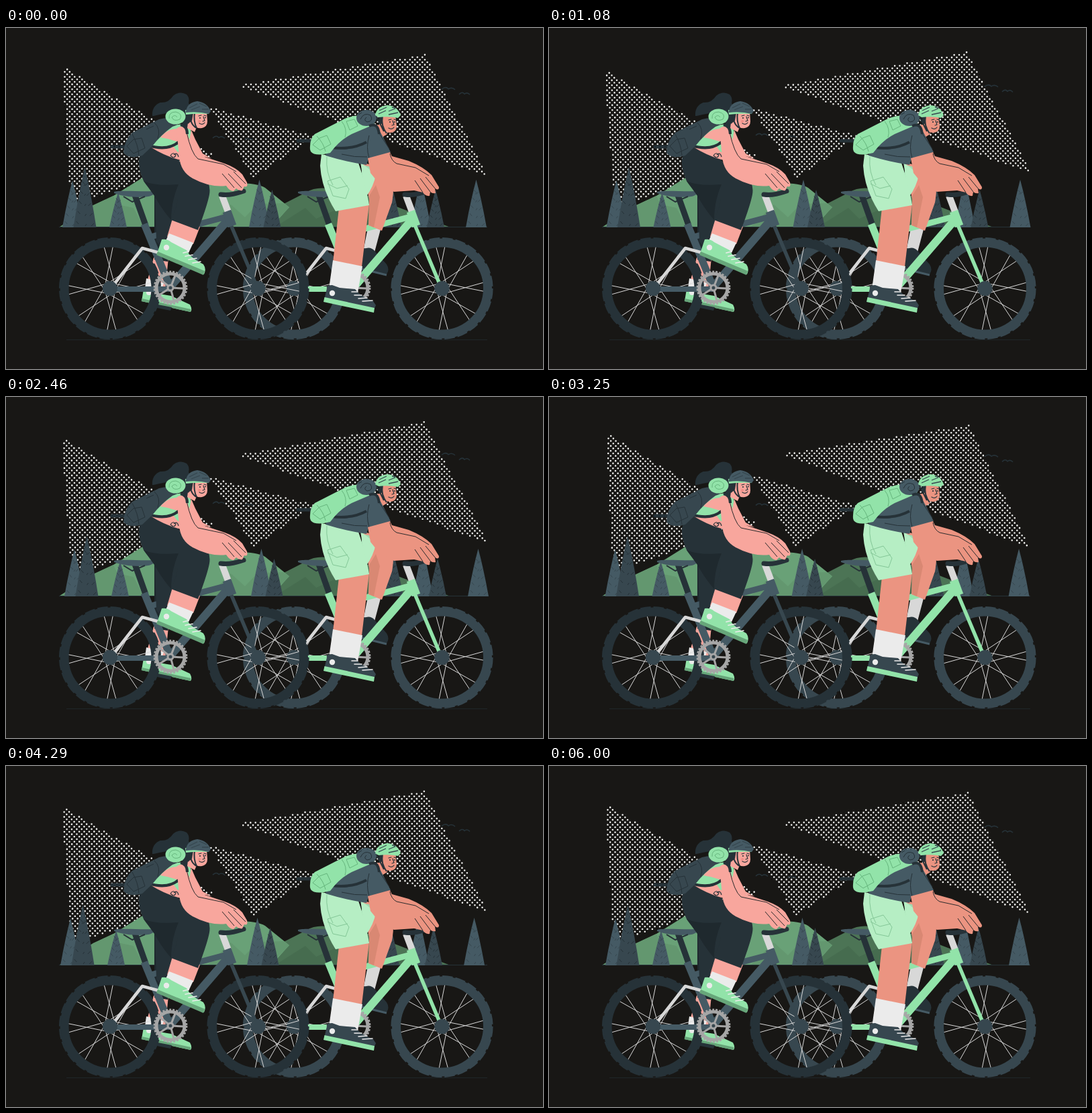
Write an HTML page that moves like this. It is 800 px wide and 508 px high and loops after 6.04 s.

```html
<!DOCTYPE html>
<html lang="en">
<head>
<meta charset="utf-8">
<title>Cyclists</title>
<style>
html, body { margin: 0; width: 100%; height: 100%; overflow: hidden; background: #181715; }
svg { display: block; width: 800px; height: 508px; }
</style>
</head>
<body>
<svg id="stage" viewBox="0 0 800 508" fill="none" stroke-linejoin="round"></svg>
<script>
const stage = document.getElementById("stage");
const INK = "#263238", SLATE = "#37474f", STEEL = "#455a64", MINT = "#92e3a9",
  PALE = "#b6eec4", ROSE = "#f8a69d", CLAY = "#eb9481", GREY = "#d8d8d8", WHITE = "#ebebeb";

const shape = (fill, d) => `<path fill="${fill}" d="${d}"/>`;
const line = (color, width, d, cap = "butt") =>
  `<path stroke="${color}" stroke-width="${width}" stroke-linecap="${cap}" d="${d}"/>`;
const disc = (x, y, r, fill) => `<circle cx="${x}" cy="${y}" r="${r}" fill="${fill}"/>`;
const ring = (x, y, r, color, width, extra = "") =>
  `<circle cx="${x}" cy="${y}" r="${r}" stroke="${color}" stroke-width="${width}" ${extra}/>`;
const polar = (x, y, r, a) => `${(x + r * Math.cos(a)).toFixed(1)} ${(y + r * Math.sin(a)).toFixed(1)}`;

function tree(x, top, half, color, mark) {
  const h = 297 - top;
  let twigs = "";
  for (let i = 2; i <= 6; i++) {
    const y = top + h * i / 6, w = half * i / 6;
    twigs += `M${x + w * .8} ${y - 6}l-4 4M${x - w * .75} ${y - 9}l3.5 4M${x + w * .15} ${y - 5}l-2 3`;
  }
  return shape(color, `M${x} ${top}Q${x + half * .55} ${top + h * .45} ${x + half} 297H${x - half}Q${x - half * .55} ${top + h * .45} ${x} ${top}Z`) +
    line(mark, 1, twigs);
}

function wheel(x, y, color) {
  let spokes = "";
  for (let i = 0; i < 16; i++) {
    const a = i * Math.PI / 8 + .12 + (i % 2 ? .13 : -.05);
    spokes += `M${polar(x, y, 9, a + (i % 2 ? 1 : -1))}L${polar(x, y, 63, a)}`;
  }
  return line(GREY, 1, spokes) + ring(x, y, 68, color, 13) +
    ring(x, y, 74.6, color, 3, 'stroke-dasharray="15.5 4.03"') + disc(x, y, 11, SLATE);
}

function chainring(x, y) {
  let arms = "";
  for (let i = 0; i < 5; i++) arms += `M${x} ${y}L${polar(x, y, 20, i * Math.PI * .4 - 1.2)}`;
  return ring(x, y, 21, "#a6a6a6", 5) + ring(x, y, 24.2, "#a6a6a6", 2.4, 'stroke-dasharray="3 2.07"') +
    line("#a6a6a6", 3, arms) + disc(x, y, 5.5, "#a6a6a6") + disc(x, y, 2.5, SLATE);
}

function bike(x, frame, fork, tyre) {
  // x is the rear hub, all tubes are relative to it
  return wheel(x, 388, tyre) + wheel(x + 220.5, 388, tyre) +
    `<g transform="translate(${x} 0)">` +
    line(INK, 9, "M37 249L53 294") +
    line(frame, 11, "M51 292L90 387") +
    line(frame, 9, "M57 312L178 280") +
    line(frame, 12, "M91 384L178 283") +
    line(frame, 8, "M0 389H90") +
    line(GREY, 4.5, "M5 383L48 328L74 335") +
    line(fork, 5.5, "M179 291L219 386") +
    line(GREY, 10, "M167 250L176 274") +
    line(frame, 13, "M174 273L182 295") +
    disc(0, 388, 11, SLATE) + disc(220.5, 388, 11, SLATE) +
    shape(STEEL, "M6 244C14 241 45 244 65 243C69 245 64 250 57 251C42 253 22 252 6 246Z") +
    line(INK, 2, "M20 251L33 259L52 251") +
    line(INK, 7, "M165 248C178 250 190 246 199 243", "round") + "</g>";
}

const sky = `
  <path class="patch" d="M83.5 57L310 190L97 263Z"/>
  <path class="patch" d="M302 117L460 162L368 223Z"/>
  <path class="patch" d="M346 86L624.5 39.5L717 220.5Z"/>
  <path id="dots" stroke="#f0f0ee" stroke-width="2.6" stroke-linecap="round"/>`;

const birds = [[317, 162, 9], [659, 89.5, 10], [683, 97, 8], [362, 165, 6]].map(([x, y, w]) =>
  line(INK, 1.6, `M${x - w} ${y + 2}q${w * .6} -5 ${w} -.5q${w * .5} -3.5 ${w} 1`)).join("");

const hills =
  shape("#4c7455", "M398 270L447 245Q460 237 478 239L540 250L662 297H390Z") +
  shape("#466c4f", "M400 297L446 268L462 284L498 268L660 297Z") +
  shape("#69a177", "M79 297L130 264L160 250L205 222Q230 202 262 208L306 234L345 231Q374 231 386 238L422 267L395 297Z") +
  shape("#63976f", "M79 297L130 264L160 250L166 263L190 268L205 297Z") +
  shape("#63976f", "M300 297L335 263L356 282L375 262L414 261L422 267L392 297Z") +
  line(INK, 1, "M79 296.5H717");

const woods =
  tree(575, 236, 14, SLATE, INK) +
  tree(99, 227, 15, STEEL, SLATE) + tree(117.5, 207, 17, SLATE, INK) + tree(167, 245, 13, STEEL, SLATE) +
  tree(377.5, 226, 15.5, STEEL, SLATE) + tree(396.5, 241, 13, SLATE, INK) +
  tree(618, 226, 15, STEEL, SLATE) + tree(640, 241, 13, SLATE, INK) + tree(700.5, 226, 15.5, STEEL, SLATE);

const man =
  // far leg
  shape(GREY, "M540 293L558 300L549 334L533 328Z") +
  shape(INK, "M530 330Q543 324 549 332L567 352Q572 360 567 367L524 357Z") +
  line(STEEL, 3, "M526 358L567 368") +
  bike(429, MINT, MINT, SLATE) + chainring(518, 387) +
  shape(CLAY, "M530 200L573 212Q580 232 575 260L560 302L540 294L541 255Z") +
  shape("#d98873", "M551 234L541 250V294L548 297L557 252Z") +
  shape("#a0dab1", "M530 204L550 208L549 225L541 244L530 258Z") +
  shape(PALE, "M528 200L551 218Q548 236 536 252Z") +
  // near leg
  shape(CLAY, "M496 268L541 262L530 356L487 350Z") +
  shape(WHITE, "M487 346L531 355L524 394L481 389Z") +
  shape(SLATE, "M478 388Q476 383 486 383L497 387L520 389Q528 400 547 407L551 413L548 420L474 405Z") +
  shape(MINT, "M474.5 401L549 417L548 424L473 408Z") +
  disc(486, 395, 4.2, WHITE) +
  line(WHITE, 1.6, "M515 393L524 393M519 398L530 398M525 403L538 402M531 407L546 406", "round") +
  // shorts
  shape(PALE, "M470 188Q500 193 525 201Q536 232 541 264L491 273Q470 240 468 205Z") +
  line("#84c797", 1, "M478 192Q476 215 487 234M479 228L498 222L511 240L506 254L487 250ZM479 232L493 239L509 235") +
  // shirt and neck
  shape(CLAY, "M548 145L566 143L568 158L555 166Z") +
  shape(STEEL, "M476 190L484 168L540 140Q556 149 562 163L573 185L540 195L537 204Q505 199 476 190Z") +
  line(INK, 1, "M541 160Q536 178 541 194M556 157L571 180M500 188Q520 193 538 192") +
  line(INK, 4, "M484 178Q515 182 537 170") +
  // arms
  shape(CLAY, "M539 194L572 185L575 191L600 198Q622 207 634 219L645 237Q645 243 639 239L640 246Q635 247 632 244L631 250Q625 251 621 245L608 242L578 244Q554 232 543 216Z") +
  line("#2b2b2c", 1, "M572 187Q574 198 582 202L610 208L630 220M609 227L621 245M617 224L632 244M625 222L640 240") +
  // bag
  line(INK, 5, "M435 168L455 168", "round") +
  shape(MINT, "M453 181Q452 165 460 158L505 135Q530 125 548 137Q552 142 543 146L515 158Q497 167 483 186Q460 192 454 184Z") +
  line("#66b57d", 1, "M463 161Q473 171 476 184M457 174L467 164L478 160L484 173L468 182ZM507 139L519 136L524 146L512 152ZM500 139Q509 150 505 163") +
  `<ellipse cx="537" cy="134" rx="15" ry="12" fill="${STEEL}"/>` +
  line(INK, 1, "M528 136Q533 125 543 130Q548 139 538 140Q532 137 537 133M525 129L530 126") +
  line(INK, 4, "M541 146Q554 140 556 158") +
  // head
  shape(CLAY, "M557 130L580 130L582 146Q582 155 573 156Q562 157 558 145Z") +
  shape(INK, "M555 129L562 130L561 142L557 144Z") +
  line(INK, 2, "M560 131Q559 147 567 157M552 132L563 154") +
  line(INK, 1.2, "M570 137l4 -1M578 136l3 1M576 138l2 6l-3 1M570 149q5 3 8 -1", "round") +
  disc(572, 140, 1.1, INK) + disc(579, 140, 1, INK) +
  shape(MINT, "M550 130Q552 117 568 115Q583 116 588 130L584 134Q570 131 555 133Z") +
  line(SLATE, 1.3, "M556 123L567 118M555 128L566 123M570 124L580 120M570 129L584 126M575 118l5 1");

const woman =
  // far leg
  shape(ROSE, "M220 342L242 342L237 392L208 386Z") +
  shape(WHITE, "M209 373L235 380L230 394L207 388Z") +
  shape(MINT, "M205 389Q218 386 228 396L246 399L274 412Q278 419 275 423L202 407Z") +
  line("#67a67a", 4, "M202 405L275 421") + disc(213, 394, 4, WHITE) +
  shape("#1f292e", "M221 248L262 250L249 312L241 348L221 345Z") +
  bike(155, STEEL, SLATE, INK) +
  shape(INK, "M222 250L262 250L246 300L231 325L224 318Z") +
  shape(INK, "M226 412L247 416L245 421L225 417Z") +
  chainring(245, 387) +
  // near leg
  shape(ROSE, "M248 284L289 296L279 322L240 311Z") +
  shape(WHITE, "M243 306L279 320L272 335L236 321Z") +
  shape(MINT, "M232 315Q240 314 246 319L269 331Q275 343 294 352Q299 359 295 367L225 336Z") +
  shape("#67a67a", "M226 333L296 362L294 368L224 338Z") +
  disc(239, 327, 4.2, WHITE) +
  line(WHITE, 1.6, "M264 335L272 333M267 340L278 338M272 345L284 343M278 350L290 348", "round") +
  shape(INK, "M198 196Q200 183 214 176L256 195Q266 213 292 222Q306 229 303 248Q300 264 286 301L246 286Q253 270 256 256Q222 254 205 228Q197 210 198 196Z") +
  shape("#1f292e", "M205 228Q222 236 257 233Q246 258 246 286Q232 270 221 250Z") +
  // torso
  shape(ROSE, "M213 176L235 158L262 160L262 197Q240 193 213 176Z") +
  shape(MINT, "M213 176L238 146L273 142L278 165L276 185Q262 189 255 184L250 177Z") +
  shape(ROSE, "M230 163Q240 150 256 150L260 171Q245 165 230 163Z") +
  line(INK, 1.2, "M245 190q4 -6 8 -1q-2 7 -8 1M250 189q5 -5 7 3") +
  line(INK, 4, "M212 175Q242 184 258 169") +
  // arms
  shape(ROSE, "M276 152L282 166L293 187L306 194L270 186Z") +
  shape(ROSE, "M254 150Q260 144 268 149L272 163L283 184Q288 190 302 194L326 202Q343 208 352 218L359 230Q361 238 355 236L352 242Q347 243 343 239L339 243Q333 243 328 235Q304 238 278 224Q260 214 258 192Z") +
  line("#2b2b2c", 1, "M269 155Q276 187 286 195L324 203L343 214M322 217L340 238M331 217L351 238M339 214L357 232") +
  // hair
  shape(INK, "M218 131Q217 116 230 111Q242 112 249 101Q259 93 269 99Q274 104 272 112L279 122L270 151Q262 146 258 127Q249 121 239 127Q228 129 220 131Z") +
  // bag
  line(INK, 5, "M158 177L178 177", "round") +
  shape(SLATE, "M175 186Q176 167 188 156L228 136Q248 131 258 139Q260 143 248 147Q232 158 217 177L203 190Q183 196 175 186Z") +
  line(INK, 1, "M188 158Q197 174 198 190M180 176L190 166L202 164L207 179L190 187ZM221 141Q231 150 226 165M209 151L220 146") +
  `<ellipse cx="252.5" cy="132" rx="15" ry="11.5" fill="${MINT}"/>` +
  line("#66b57d", 1, "M243 135Q242 125 253 125Q264 128 259 136Q250 140 247 133Q252 128 255 133") +
  line(INK, 4, "M260 144Q270 146 270 158") +
  // head
  shape(ROSE, "M273 126L299 124L300 139Q300 147 292 149Q287 150 284 148L281 155L270 149Z") +
  shape(INK, "M268 126L279 126L277 138L271 143Z") +
  line(INK, 2, "M274 127Q274 144 284 149M281 126Q279 139 284 149") +
  line(INK, 1.2, "M287 131l4 -1M295 130l3 1M294 132l2 6l-3 1M288 142q5 3 8 -1", "round") +
  disc(289, 134, 1.1, INK) + disc(297, 133.5, 1, INK) + disc(288, 139, 2, "#f08f88") +
  shape(MINT, "M267 122L276 123L303 125L302 128Q284 127 268 129Z") +
  shape(STEEL, "M268 124Q270 111 285 109Q300 111 305 124L302 128Q286 124 268 126Z") +
  line(SLATE, 1.3, "M273 119L285 113M276 122L289 117M288 112L299 117M292 121L302 121");

stage.innerHTML =
  `<g id="sky">${sky}</g><g id="birds">${birds}</g>${hills}<g id="woods">${woods}</g>` +
  line("#1f2629", 1, "M90 464.5H717") + man + woman;

// whole dots on a staggered grid, kept only inside the patches
const patches = [...document.querySelectorAll(".patch")];
const spot = stage.createSVGPoint();
let grid = "";
for (let row = 0; row < 66; row++) {
  for (let col = 0; col < 88; col++) {
    spot.x = 80 + col * 7.4 + (row % 2) * 3.7;
    spot.y = 36 + row * 3.7;
    if (patches.some(p => p.isPointInFill(spot))) grid += `M${spot.x.toFixed(1)} ${spot.y.toFixed(1)}h0`;
  }
}
document.getElementById("dots").setAttribute("d", grid);
patches.forEach(p => p.remove());

const move = (id, value) => document.getElementById(id).setAttribute("transform", value);
const shake = [0, -1, 2, -4, 4, -4, 4, -4, 2, -1, 0];

function frame() {
  const t = performance.now() % 6040 + 15;
  const beat = t % 1500 / 1500;
  const swing = beat < .25 ? beat * 4 : beat < .75 ? 2 - beat * 4 : beat * 4 - 4;
  const step = t % 6000 / 600, i = Math.floor(step);
  move("sky", `rotate(${swing} 400 150)`);
  move("birds", `translate(0 ${-7.5 * (1 - Math.abs(1 - 2 * beat))})`);
  move("woods", `translate(${shake[i] + (shake[i + 1] - shake[i]) * (step - i)} 0)`);
  requestAnimationFrame(frame);
}
frame();
</script>
</body>
</html>
```
